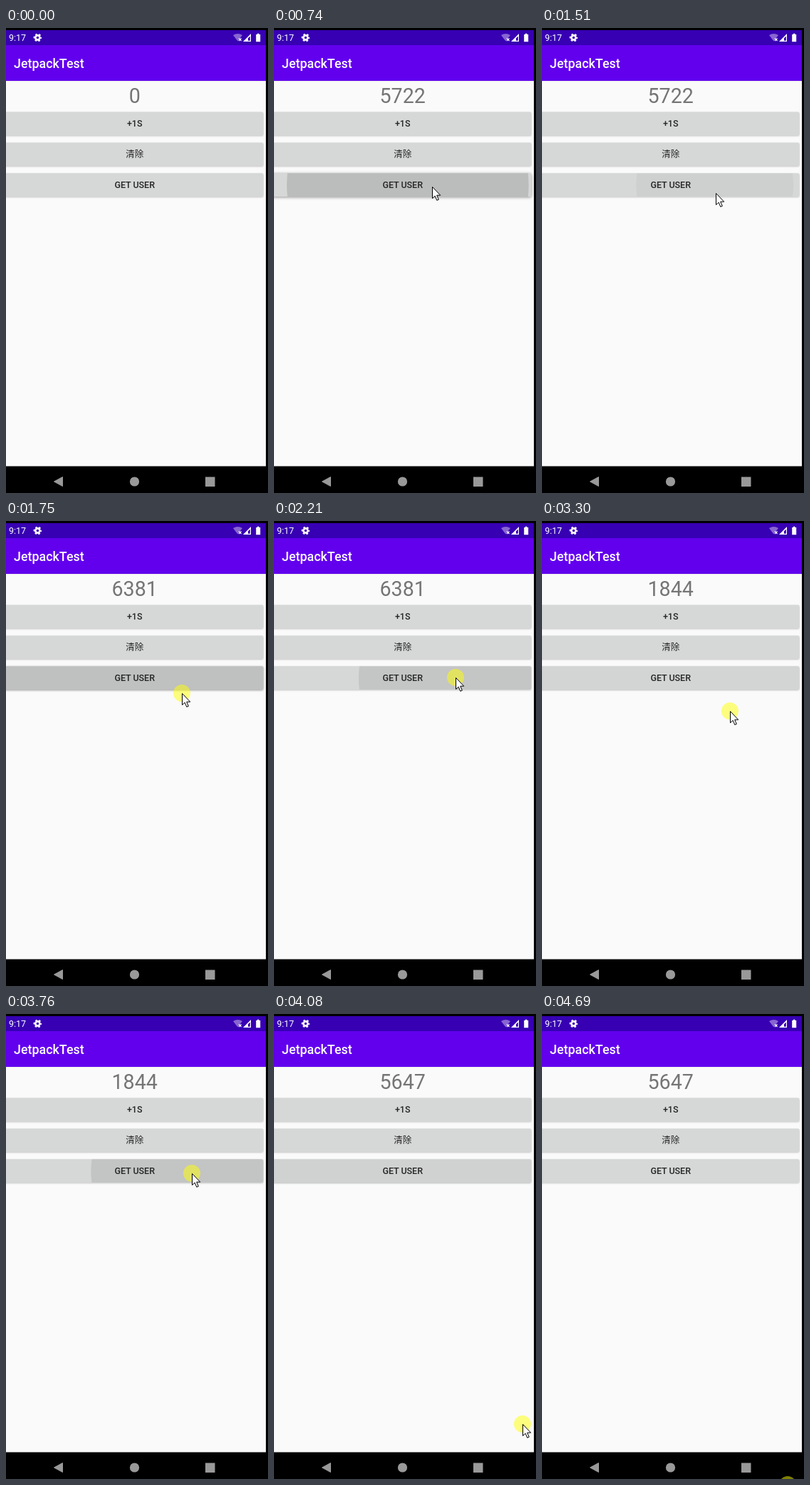
An HTML page for the animation above (4.77 s loop, 368x651 px).

```html
<!DOCTYPE html>
<html lang="en">
<head>
<meta charset="utf-8">
<title>JetpackTest</title>
<style>
  html, body { margin: 0; width: 100%; height: 100%; overflow: hidden; background: #000; }
  svg { display: block; width: 368px; height: 651px; font-family: Roboto, "Noto Sans CJK SC", "Noto Sans CJK", sans-serif; }
  .btn { fill: #d6d7d7; filter: drop-shadow(0 1px 1px rgba(0, 0, 0, .22)); }
  .label { font-size: 12.5px; font-weight: 500; fill: #262626; text-anchor: middle; }
  .bar { fill: #fff; }
</style>
</head>
<body>
<svg viewBox="0 0 368 651">
  <defs>
    <clipPath id="mask"><rect x="-3" y="203.3" width="364.4" height="32.7" rx="2"/></clipPath>
  </defs>
  <rect y="3" width="365" height="610.5" fill="#fafafa"/>
  <rect y="74" width="365" height="1" fill="#000" opacity=".06"/>
  <rect y="3" width="365" height="21" fill="#3700b3"/>
  <rect y="24" width="365" height="50" fill="#6200ee"/>

  <g class="bar">
    <text x="4" y="18" font-size="12.5">9:17</text>
    <circle cx="44.4" cy="13.5" r="3.1" fill="none" stroke="#fff" stroke-width="2.6"/>
    <circle cx="44.4" cy="13.5" r="4.8" fill="none" stroke="#fff" stroke-width="2" stroke-dasharray="2.5 2.53" stroke-dashoffset="1.25"/>
    <path d="M319 10Q325.5 6 332 10L325.5 18.5Z" opacity=".4"/>
    <path d="M327 14.5l3.5 3.5m0-3.5l-3.5 3.5" stroke="#fff" stroke-width="1.2"/>
    <path d="M344 8V19H333Z"/>
    <path d="M342.8 11.5V17.8H340V14.3Z" fill="#3700b3"/>
    <path d="M351.200 9h1.700v-1.300h2.600v1.300h1.700v10.200h-6z"/>
    <text x="11" y="55.5" font-size="17.86" font-weight="500">JetpackTest</text>
  </g>

  <text id="count" x="180.7" y="104.5" font-size="28.6" fill="#757575" text-anchor="middle">0</text>
  <rect class="btn" x="-3" y="117.5" width="364.4" height="32.7" rx="2"/>
  <rect class="btn" x="-3" y="160.4" width="364.4" height="32.7" rx="2"/>
  <rect class="btn" id="get" x="-3" y="203.3" width="364.4" height="32.7" rx="2"/>
  <g clip-path="url(#mask)"><circle id="ripple" cy="220"/></g>
  <g class="label">
    <text x="180.7" y="138">+1S</text>
    <text x="180.7" y="181" font-weight="400">清除</text>
    <text x="180.7" y="224">GET USER</text>
  </g>

  <g fill="#999">
    <path d="M67.5 635L79.500 628.500V641.500Z" stroke="#999" stroke-linejoin="round"/>
    <circle cx="180.5" cy="635" r="6.6"/>
    <rect x="280" y="628.5" width="13.5" height="13.5"/>
  </g>

  <g id="cursor">
    <circle id="halo" r="12" fill="#ff0" fill-opacity=".5"/>
    <path d="M.5.5V16.5L4.2 13.2L6.8 19.3L9.3 18.2L6.7 12.2H11.7Z" fill="#fff" stroke="#000"/>
  </g>
</svg>
<script>
const LOOP = 4770, TICK = 77, LEAD = 30;
const CENTER = 181, START_R = 109, END_R = 182;
const $ = id => document.getElementById(id);
const clamp = v => Math.min(1, Math.max(0, v));
const mix = (a, b, u) => a + (b - a) * u;
const smooth = u => u * u * (3 - 2 * u);

// Ripple start and pointer release in ms, touch point, number it brings
const clicks = [
  { at: 616, release: 150, x: 222, y: 222, value: 5722 },
  { at: 1490, release: 40, x: 244, y: 231, value: 6381 },
  { at: 2152, release: -10, x: 255, y: 219, value: 5540 },
  { at: 2897, release: -10, x: 266, y: 216, value: 1844 },
  { at: 3689, release: -10, x: 261, y: 223, value: 5647 }
];

// The pointer enters, sinks to a rest after each click, then leaves at the bottom
const path = [{ at: TICK - LEAD, x: 285, y: 497 }];
clicks.forEach(({ at, x, y }, i) => {
  if (i) path.push({ ...path[path.length - 1], at: at - 280 });
  path.push({ at: at - 30, x, y }, { at: at + 130, x, y });
  const next = clicks[i + 1];
  if (next) path.push({ at: at + 370, x: (x + next.x) / 2, y: 242 + 8 * i });
});
path.push({ at: 4070, x: 350, y: 580 }, { at: 4450, x: 345, y: 690 }, { at: 4667, x: 345, y: 659 });

function pointer(t) {
  const i = path.findIndex(p => p.at > t);
  if (i < 1) return i ? path[path.length - 1] : path[0];
  const a = path[i - 1], b = path[i], u = smooth((t - a.at) / (b.at - a.at));
  return { x: mix(a.x, b.x, u), y: mix(a.y, b.y, u) };
}

// cubic-bezier(.4, 0, .2, 1)
function fastOutSlowIn(x) {
  let lo = 0, hi = 1, s = .5;
  for (let i = 0; i < 20; i++) {
    s = (lo + hi) / 2;
    const bx = 1.2 * (1 - s) ** 2 * s + .6 * (1 - s) * s * s + s ** 3;
    if (bx < x) lo = s; else hi = s;
  }
  return smooth(s);
}

function draw(ms) {
  // The screen refreshes in even ticks
  const t = Math.max(0, Math.floor((ms + LEAD) / TICK) * TICK - LEAD);

  const { x, y } = pointer(t);
  $("cursor").setAttribute("transform", `translate(${Math.round(x)} ${Math.round(y)})`);
  $("cursor").style.display = t ? "" : "none";
  const held = clicks.some(c => t > c.at - 90 && t < c.at + c.release);
  $("halo").style.display = held ? "none" : "";

  const done = clicks.filter(c => t - c.at >= 95).pop();
  $("count").textContent = done ? done.value : 0;

  const last = clicks.filter(c => c.at <= t).pop() || { at: -LOOP, x: CENTER };
  const age = t - last.at, grow = fastOutSlowIn(clamp(age / 225));
  const fade = 1 - clamp((age - 225) / 175);
  const ripple = $("ripple");
  ripple.setAttribute("cx", mix(last.x, CENTER, grow));
  ripple.setAttribute("r", mix(START_R, END_R, grow));
  ripple.setAttribute("opacity", .125 * clamp(age / 75) * fade);

  const lift = clamp((age - 60) / 60) * fade;
  $("get").style.filter = `drop-shadow(0 1px ${1 + lift}px rgba(0, 0, 0, ${.22 + .2 * lift}))`;
}

const begin = performance.now();
function loop() {
  draw((performance.now() - begin) % LOOP);
  requestAnimationFrame(loop);
}
loop();
</script>
</body>
</html>
```
